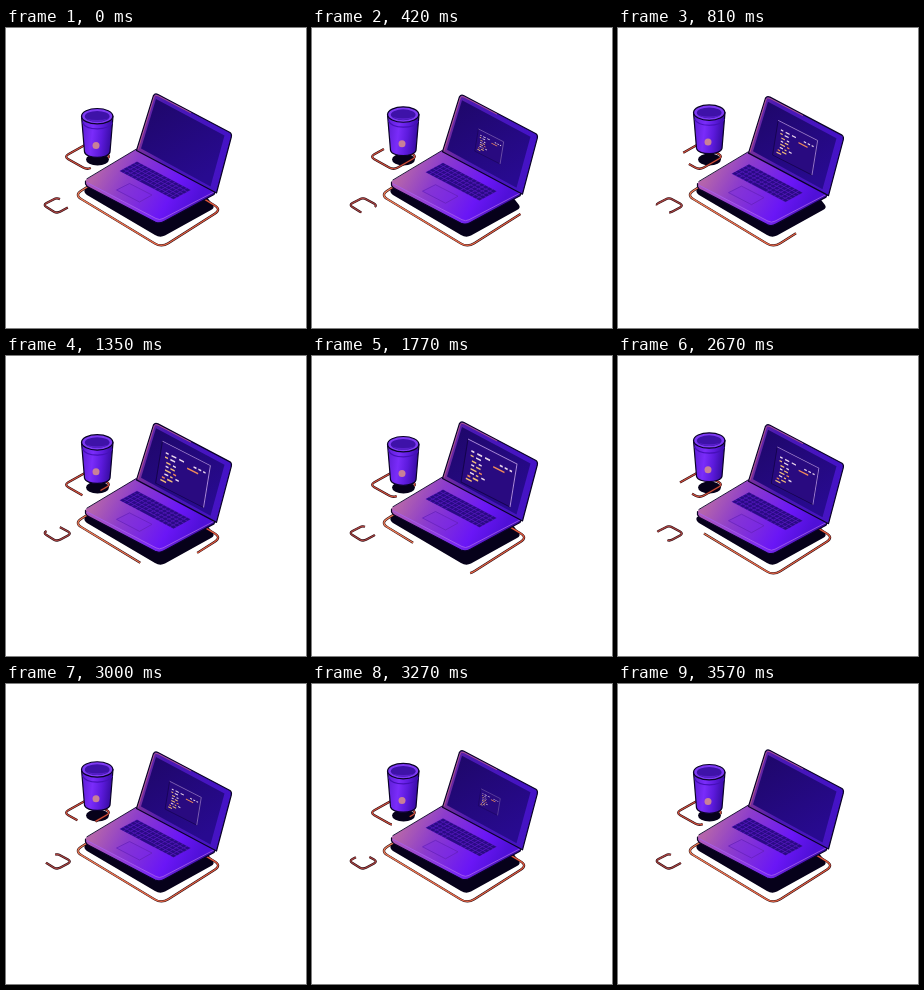
Animation, 300 px wide and 300 px high, one loop 3630 ms. Source, as an HTML page:

```html
<!DOCTYPE html>
<html lang="en">
<head>
<meta charset="utf-8">
<title>Laptop and cup</title>
<style>
  html, body { margin: 0; width: 100%; height: 100%; overflow: hidden; background: #fff; }
  svg { display: block; width: 100vw; height: 100vh; }
</style>
</head>
<body>
<svg viewBox="0 0 300 300">
  <defs>
    <linearGradient id="deck" x1="92" y1="140" x2="182" y2="190" gradientUnits="userSpaceOnUse">
      <stop offset="0" stop-color="#b464ac"/>
      <stop offset=".3" stop-color="#8c3ccc"/>
      <stop offset=".75" stop-color="#6a16f6"/>
      <stop offset="1" stop-color="#5010d8"/>
    </linearGradient>
    <linearGradient id="side" x1="0" x2="1">
      <stop offset="0" stop-color="#b05ab8"/>
      <stop offset=".5" stop-color="#7a28f4"/>
      <stop offset="1" stop-color="#3408a0"/>
    </linearGradient>
    <linearGradient id="lid" x1="0" x2="1">
      <stop offset="0" stop-color="#7a309c"/>
      <stop offset=".3" stop-color="#4a18b4"/>
      <stop offset="1" stop-color="#4412c8"/>
    </linearGradient>
    <linearGradient id="glass" x1="0" y1="0" x2=".6" y2="1">
      <stop offset="0" stop-color="#1e0768"/>
      <stop offset="1" stop-color="#280a90"/>
    </linearGradient>
    <linearGradient id="cupBody" x1="0" x2="1" y2=".15">
      <stop offset="0" stop-color="#5a1cd0"/>
      <stop offset=".4" stop-color="#7a2cfa"/>
      <stop offset=".7" stop-color="#5c1adc"/>
      <stop offset="1" stop-color="#380ca4"/>
    </linearGradient>
    <linearGradient id="wire" x1="70" x2="215" y1="0" y2="0" gradientUnits="userSpaceOnUse">
      <stop offset="0" stop-color="#f08058"/>
      <stop offset="1" stop-color="#e0583c"/>
    </linearGradient>
  </defs>

  <path d="M79 161 L93 154 L200 168 L207 177 Q209 180 205 182 L159 207.500 Q154 210 149 207 L81 167 Q77 164 79 161Z" fill="#06011a"/>
  <ellipse cx="91.500" cy="131.500" rx="11.500" ry="6" fill="#06011a"/>
  <g id="wires" fill="none"></g>

  <g id="cup" stroke-linejoin="round">
    <path d="M75.500 88 L78.500 124 C80 131 102.500 131 104 124 L107 88Z" fill="url(#cupBody)" stroke="#0a0228" stroke-width="1.200"/>
    <path d="M76.500 94.500 C80 103 103 103 106.300 94.500" fill="none" stroke="#4610b8" stroke-width="1.200"/>
    <ellipse cx="91.200" cy="88.200" rx="15.600" ry="7.700" fill="#7e3af4" stroke="#0a0228" stroke-width="1.200"/>
    <ellipse cx="91.200" cy="88.400" rx="12.400" ry="5.400" fill="#3e12a8"/>
    <path d="M80 90.500 Q91 97 102.500 90.500 Q91 93.500 80 90.500" fill="#5a20cc"/>
    <circle cx="90" cy="117.500" r="3.500" fill="#c88098"/>
  </g>

  <g id="laptop" stroke-linejoin="round">
    <path d="M79.500 153 L79.500 156 Q80.500 158.500 84 160 L149 194 Q153.500 196 158 193.500 L208 166.500 L209.500 163Z" fill="url(#side)" stroke="#0a0228" stroke-width="1.200"/>
    <path d="M81 151 L130.500 121 L209.500 163 L157 190.500 Q153.500 192.500 150 190.500 L81 154.500 Q78.500 153 81 151Z" fill="url(#deck)"/>
    <path d="M80.500 151 L130.500 121" fill="none" stroke="#0a0228" stroke-width=".9"/>
    <path d="M81 154.500 L150 190.500 Q153.500 192.500 157 190.500 L208 164" fill="none" stroke="#a860f0" stroke-width=".8"/>
    <g id="keys" fill="#2a0a84"></g>
    <path d="M110.500 162 L123.500 155.500 L146 167 L133.500 174Z" fill="#7c2ce0" fill-opacity=".4" stroke="#6420b8" stroke-width=".7"/>
    <path d="M130.500 122.500 L147.500 67.500 Q149 65 152 66.500 L224 104.500 Q226 106 225.300 109 L210.500 165Z" fill="url(#lid)" stroke="#0a0228" stroke-width="1.200"/>
    <path d="M132 121.500 L148.300 68.500 Q149.500 66.500 152 67.800 L185 85" fill="none" stroke="#b4588c" stroke-width=".9"/>
    <path d="M135 120.500 L150 71 L218.500 107.500 L204.500 158.500Z" fill="url(#glass)"/>
    <g id="win"></g>
  </g>
</svg>
<script>
const LOOP = 3630, STEP = 30, LAST = 3570, SPAN = 3600;
const NS = 'http://www.w3.org/2000/svg';
const $ = id => document.getElementById(id);

function add(parent, tag, attrs) {
  const el = document.createElementNS(NS, tag);
  for (const k in attrs) el.setAttribute(k, attrs[k]);
  return parent.appendChild(el);
}

// Closed path through the corners, each rounded by r
function roundLoop(pts, r) {
  const toward = (a, b) => {
    const d = Math.hypot(b[0] - a[0], b[1] - a[1]);
    return [a[0] + (b[0] - a[0]) * r / d, a[1] + (b[1] - a[1]) * r / d];
  };
  const n = pts.length;
  let d = 'M' + toward(pts[0], pts[1]);
  for (let i = 1; i <= n; i++) {
    const p = pts[i % n];
    d += 'L' + toward(p, pts[i - 1]) + 'Q' + p + ' ' + toward(p, pts[(i + 1) % n]);
  }
  return d + 'Z';
}

// A wire is a loop with one travelling gap; start(t) is a fraction of its length
function makeWire(pts, r, gap, color, start) {
  const base = {
    d: roundLoop(pts, r), pathLength: 100,
    'stroke-dasharray': (1 - gap) * 100 + ' ' + gap * 100
  };
  const lines = [['#2a0810', 2.3], [color, 1.2]].map(([stroke, width]) =>
    add($('wires'), 'path', { ...base, stroke, 'stroke-width': width }));
  return t => {
    const shift = (((start(t) + gap) % 1) + 1) % 1;
    lines.forEach(l => l.setAttribute('stroke-dashoffset', -shift * 100));
  };
}

const easeOut = u => 1 - Math.pow(1 - u, 1.75);
const wires = [
  makeWire([[68.5, 167], [155.5, 219.5], [215.5, 181.5], [128.5, 129]], 8, .197, 'url(#wire)',
    t => .582 - t / SPAN),
  makeWire([[58, 128.8], [81.5, 142], [105, 128.5], [81.5, 115.5]], 5, .2, '#d0503c',
    t => .25 + easeOut(t % 1800 / 1800)),
  makeWire([[37, 177], [51, 185.5], [65.5, 177.5], [51, 169.5]], 4, .25, '#a84440',
    t => .41 - t / 1800)
];

// Keyboard: rows of keys on the slanted deck
const keys = add($('keys'), 'g', { transform: 'matrix(.54 .285 -.175 .095 131 133.5)' });
add(keys, 'rect', { width: 100, height: 100, fill: '#5418bc' });
for (let row = 0; row < 5; row++) {
  for (let col = 0; col < 14; col++) {
    if (row === 4 && col > 4 && col < 9) continue;
    add(keys, 'rect', { x: col * 7.15 + .6, y: row * 20 + 2, width: 5.8, height: 16 });
  }
}
add(keys, 'rect', { x: 36.3, y: 82, width: 27, height: 16 });

// Code window in a 100 x 100 slanted space
const pane = add($('win'), 'g', { transform: 'matrix(.49 .25 -.07 .43 156 83)' });
add(pane, 'rect', { width: 100, height: 100, fill: '#290a80', stroke: '#14044c', 'stroke-width': 2 });
add(pane, 'path', { d: 'M0 0H100V100', fill: 'none', stroke: '#a884e0', 'stroke-width': 2 });
const WHITE = '#ecd8ec', GOLD = '#f0bc78', CORAL = '#f08a58';
[
  [20, [[10, 6, WHITE], [22, 10, WHITE], [38, 10, WHITE], [68, 6, WHITE], [78, 6, WHITE], [88, 5, WHITE]]],
  [30, [[10, 6, GOLD], [21, 10, WHITE], [56, 23, CORAL]]],
  [41, [[14, 9, GOLD], [28, 6, WHITE]]],
  [50, [[14, 6, WHITE], [24, 9, GOLD]]],
  [59, [[14, 12, GOLD], [31, 6, CORAL]]],
  [68, [[14, 8, WHITE], [26, 5, GOLD], [37, 7, WHITE]]],
  [77, [[10, 6, CORAL], [21, 11, GOLD]]],
  [85, [[8, 12, GOLD]]]
].forEach(([y, row]) => row.forEach(([x, width, fill]) =>
  add(pane, 'rect', { x, y, width, height: 3.6, fill })));

function draw(time) {
  const t = Math.min(LAST, Math.floor(time % LOOP / STEP) * STEP);
  const bob = (1 - Math.cos(2 * Math.PI * t / 1800)) / 2;
  $('laptop').setAttribute('transform', `translate(0 ${2.7 * bob})`);
  $('cup').setAttribute('transform', `translate(0 ${-3.7 * bob})`);

  const away = Math.abs(t - LAST / 2) / (LAST / 2);
  const size = Math.max(0, 1 - Math.pow(away, 2.7));
  $('win').setAttribute('transform',
    `translate(177.500 117.500) scale(${size}) translate(-177.500 -117.500)`);
  $('win').setAttribute('visibility', size > .01 ? 'visible' : 'hidden');
  wires.forEach(move => move(t));
}

let began;
function tick(now) {
  if (began === undefined) began = now;
  draw(now - began);
  requestAnimationFrame(tick);
}
draw(0);
requestAnimationFrame(tick);
</script>
</body>
</html>
```
